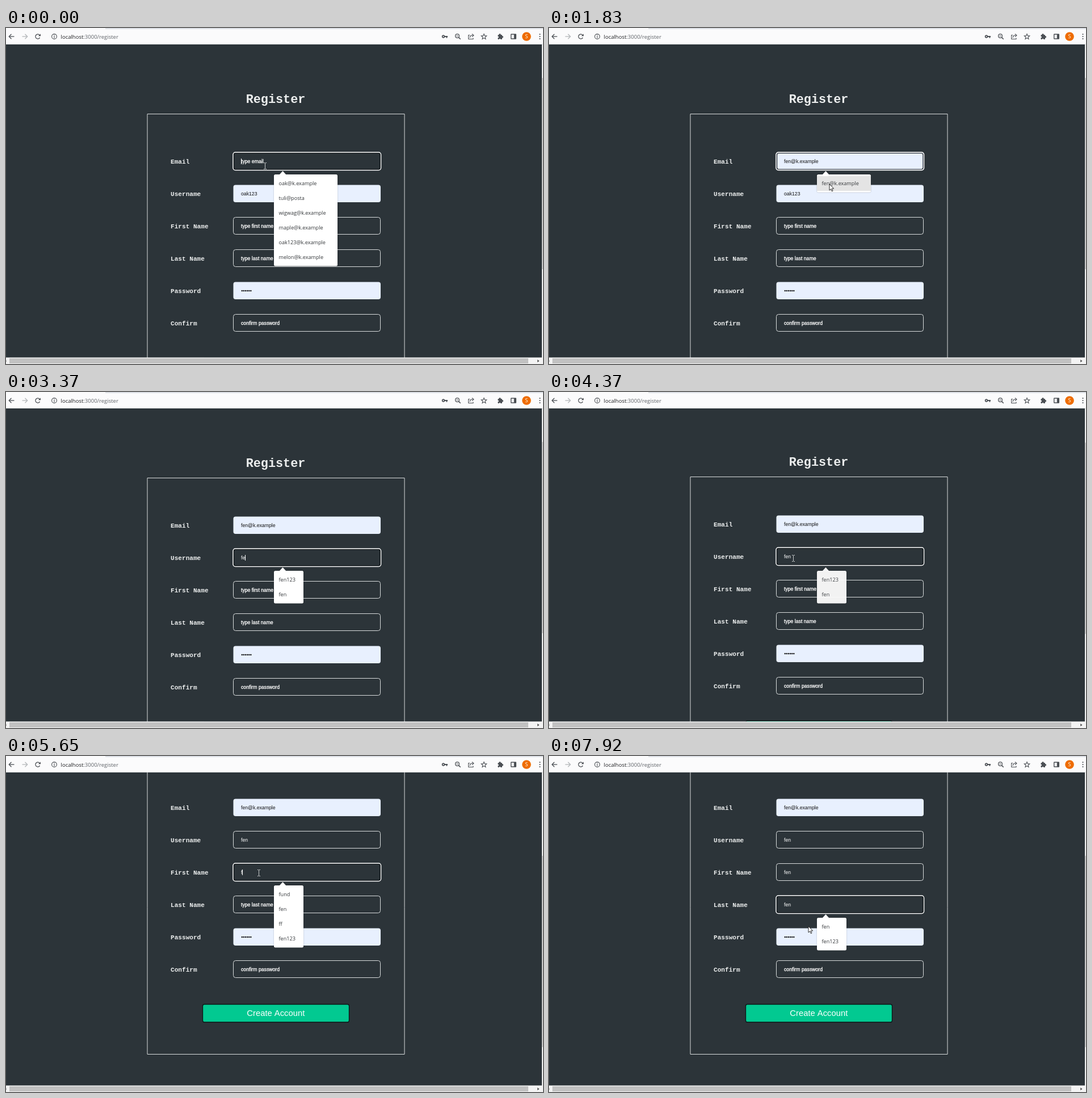
Write an HTML page with a canvas that moves like this. It is 946 by 592 pixels and loops after 8 s.

```html
<!DOCTYPE html>
<html lang="en">
<head>
<meta charset="utf-8">
<title>Register</title>
<style>
  html, body { margin: 0; width: 100%; height: 100%; overflow: hidden; background: #2c3439; }
  canvas { display: block; width: 946px; height: 592px; }
</style>
</head>
<body>
<canvas id="stage" width="946" height="592"></canvas>
<script>
const ctx = document.getElementById('stage').getContext('2d');
const LOOP = 8000, RATE = 0.011;
const SANS = '"Liberation Sans", Arial, sans-serif';
const UI = '"Open Sans", "Noto Sans", sans-serif';
const MONO = '"Liberation Mono", monospace';
const INPUT_FONT = '8.7px ' + SANS;
const BG = '#2c3439', FILLED = '#e8f0fe';
const TEXT_X = 414;
const MAIL = 'fen@k.example';

// Each value is [time, text]; an empty text shows the placeholder.
const fields = [
  { label: 'Email', hint: 'type email', filled: [1540, LOOP],
    values: [[0, ''], [540, 'f'], [630, 'fe'], [720, 'fen'], [1540, MAIL]] },
  { label: 'Username', hint: 'type username', filled: [0, 3180],
    values: [[0, 'oak123'], [3180, ''], [3270, 'f'], [3360, 'fe'], [3440, 'fen']] },
  { label: 'First Name', hint: 'type first name',
    values: [[0, ''], [5630, 'f'], [5720, 'fe'], [5810, 'fen']] },
  { label: 'Last Name', hint: 'type last name',
    values: [[0, ''], [7090, 'f'], [7270, 'fe'], [7400, 'fen']] },
  { label: 'Password', dots: true, filled: [0, LOOP], values: [[0, '']] },
  { label: 'Confirm', hint: 'confirm password', values: [[0, '']] }
];
const focusTimes = [[-140, 0], [2440, 1], [5180, 2], [6880, 3]];
const noCaret = [[1540, 2440], [2540, 3180]];

// from, to, field, width, rows
const popups = [
  [0, 540, 0, 112, ['oak@k.example', 'tuli@posta', 'wigwag@k.example', 'maple@k.example',
    'oak123@k.example', 'melon@k.example']],
  [540, 2090, 0, 95, [MAIL]],
  [2440, 3180, 1, 130, null],
  [3270, 4450, 1, 52, ['fen123', 'fen']],
  [5630, 5720, 2, 52, ['fund', 'fen', 'ff', 'fen123']],
  [5720, 6880, 2, 52, ['fen', 'fen123']],
  [7090, 7270, 3, 52, ['fund', 'fen', 'ff', 'fen123', 'fff']],
  [7270, LOOP, 3, 52, ['fen', 'fen123']]
];

// time, x, y, shape until the next point: I = text beam, A = arrow, '' = hidden
const mouse = [
  [0, 456, 243, 'I'], [540, 456, 243, ''], [1270, 456, 243, 'I'], [1450, 472, 256, 'A'],
  [1810, 494, 275, 'A'], [2090, 494, 275, 'A'], [2300, 462, 289, 'I'], [2440, 447, 292, 'I'],
  [2540, 445, 292, 'I'], [2700, 400, 292, 'A'], [2810, 386, 292, 'A'], [3180, 386, 292, ''],
  [4000, 404, 297, 'I'], [4270, 430, 293, 'I'], [4600, 430, 293, 'I'], [4815, 441, 229, 'I'],
  [4995, 445, 206, 'I'], [5720, 445, 206, ''], [6270, 445, 208, 'I'], [6500, 448, 228, 'A'],
  [6700, 450, 250, 'I'], [6900, 452, 262, 'I'], [7090, 452, 262, ''],
  [7810, 456, 291, 'A'], [7905, 457, 300, 'A'], [LOOP, 457, 300, 'A']
];

const within = (t, span) => !!span && t >= span[0] && t < span[1];
const latest = (list, t) => list.filter(e => e[0] <= t).pop();
const clamp = (v, lo, hi) => Math.min(hi, Math.max(lo, v));

function mouseAt(t) {
  const i = Math.max(0, mouse.filter(m => m[0] <= t).length - 1);
  const a = mouse[i], b = mouse[i + 1] || a;
  const p = b === a ? 0 : (t - a[0]) / (b[0] - a[0]);
  return { x: a[1] + (b[1] - a[1]) * p, y: a[2] + (b[2] - a[2]) * p, shape: a[3] };
}

function scrollAt(t) {
  const p = clamp((t - 4348) / 208.5, 0, 1);
  return Math.round(72 * (1 - Math.cos(Math.PI * p)));
}

function rect(x, y, w, h, color) {
  ctx.fillStyle = color;
  ctx.fillRect(x, y, w, h);
}

function round(x, y, w, h, r, fill, stroke, width = 1) {
  ctx.beginPath();
  ctx.roundRect(x, y, w, h, r);
  if (fill) { ctx.fillStyle = fill; ctx.fill(); }
  if (stroke) { ctx.strokeStyle = stroke; ctx.lineWidth = width; ctx.stroke(); }
}

function disc(x, y, r, color) {
  ctx.beginPath();
  ctx.arc(x, y, r, 0, 7);
  ctx.fillStyle = color;
  ctx.fill();
}

function ring(x, y, r, color, width = 1.2, from = 0, to = 7) {
  ctx.beginPath();
  ctx.arc(x, y, r, from, to);
  ctx.strokeStyle = color;
  ctx.lineWidth = width;
  ctx.stroke();
}

function poly(points, fill, stroke, width = 1, closed = true) {
  ctx.beginPath();
  points.forEach(([x, y]) => ctx.lineTo(x, y));
  if (closed) ctx.closePath();
  if (fill) { ctx.fillStyle = fill; ctx.fill(); }
  if (stroke) { ctx.strokeStyle = stroke; ctx.lineWidth = width; ctx.stroke(); }
}

const line = (points, color, width = 1.3) => poly(points, null, color, width, false);

function text(str, x, y, font, color, align = 'left') {
  ctx.font = font;
  ctx.fillStyle = color;
  ctx.textAlign = align;
  ctx.fillText(str, x, y);
}

function textWidth(str, font) {
  ctx.font = font;
  return ctx.measureText(str).width;
}

function dots(x, y, step, r, color) {
  for (let i = 0; i < 6; i++) disc(x + i * step, y, r, color);
}

const fieldTop = (i, scroll) => 219 + 57 * i - scroll;

function drawField(i, t, scroll, focused) {
  const f = fields[i], y = fieldTop(i, scroll), base = y + 19;
  const filled = within(t, f.filled), value = latest(f.values, t)[1];
  text(f.label, 290, y + 20, 'bold 11.1px ' + MONO, '#eceeee');

  if (focused) {
    round(400, y, 260.5, 31.5, 4, filled ? FILLED : BG, '#fff', 1.5);
    round(401.5, y + 1.5, 257.5, 28.5, 3, null, '#101518', 1.2);
  } else if (filled) {
    round(400.5, y + 0.5, 259.5, 30.5, 4, FILLED);
  } else {
    round(400.5, y + 0.5, 259, 30, 4, null, '#d9dcdd');
  }

  if (f.dots) {
    dots(TEXT_X + 1.8, y + 16, 3.1, 1.25, '#111');
  } else if (value) {
    text(value, TEXT_X, base, INPUT_FONT, filled ? '#111' : '#fff');
  } else {
    text(f.hint, TEXT_X, base, INPUT_FONT, '#fff');
    ctx.strokeStyle = '#fff';
    ctx.lineWidth = 0.3;
    ctx.strokeText(f.hint, TEXT_X, base);
  }
  if (!focused) return;

  if (i === 1 && within(t, [2540, 3180])) {
    const end = TEXT_X + textWidth(value, INPUT_FONT);
    const start = clamp(mouseAt(t).x, TEXT_X, end);
    ctx.save();
    ctx.beginPath();
    ctx.rect(start, y + 10, end - start, 12);
    ctx.clip();
    rect(start, y + 10, end - start, 12, '#3390ff');
    text(value, TEXT_X, base, INPUT_FONT, '#fff');
    ctx.restore();
  }

  const since = Math.max(latest(focusTimes, t)[0], latest(f.values, t)[0] || -140);
  const shown = Math.floor((t - since) / 500) % 2 === 0;
  if (shown && !noCaret.some(n => within(t, n))) {
    const x = Math.round(TEXT_X + textWidth(value, INPUT_FONT));
    rect(x, y + 11, 1, 10, filled ? '#111' : '#fff');
  }
}

function drawPage(t, scroll) {
  rect(0, 28, 946, 553, BG);
  text('Register', 475, 132 - scroll, 'bold 21.8px ' + MONO, '#eceeee', 'center');
  round(249, 151.5 - scroll, 453, 518, 0, null, '#d9dcdd');
  const focus = latest(focusTimes, t)[1];
  fields.forEach((f, i) => drawField(i, t, scroll, i === focus));
  round(346.5, 581.5 - scroll, 258, 31.5, 3, '#02c991', '#0c1416', 1.3);
  text('Create Account', 475.3, 602 - scroll, '14.8px ' + SANS, '#fff', 'center');
}

function drawAccounts(top) {
  disc(486.5, top + 23, 4.6, '#5f6368');
  poly([[484, top + 20], [487, top + 20], [486, top + 23], [483.5, top + 23]], '#e4e6e8');
  poly([[487, top + 23], [490, top + 22], [488, top + 26], [486, top + 25]], '#e4e6e8');
  text('oak123', 501, top + 19, '9.1px ' + UI, '#3c4043');
  dots(502.5, top + 31.5, 4, 1.1, '#5f6368');
  rect(472, top + 47, 130, 1, '#dadce0');
  disc(486.5, top + 64, 4.6, '#5f6368');
  text('Manage passwords...', 501, top + 67, '8.9px ' + UI, '#5f6368');
}

function drawPopup([from, to, field, width, rows], t) {
  const top = fieldTop(field, field > 1 ? 144 : 0) + 39;
  const height = rows ? 6 + 26 * rows.length : 79;
  ctx.save();
  if (within(t, [4340, 4450])) ctx.globalAlpha = 0.94;
  ctx.shadowColor = 'rgba(0,0,0,.3)';
  ctx.shadowBlur = 2;
  round(472, top, width, height - 0.5, 2.5, '#fff');
  ctx.shadowColor = 'transparent';
  poly([[481.5, top + 0.5], [487.5, top - 6], [493.5, top + 0.5]], '#fff');
  if (rows) {
    if (within(t, [1540, 2090])) rect(472, top + 3, width, 26, '#e4e4e4');
    rows.forEach((row, i) => text(row, 480.5, top + 19 + 26 * i, '9.1px ' + UI, '#35383b'));
  } else {
    drawAccounts(top);
  }
  ctx.restore();
}

function drawToolbar() {
  const dark = '#4b4f54';
  rect(0, 0, 946, 28, '#fbfbfc');
  rect(0, 28, 946, 1, '#e3e5e7');
  rect(175, 0, 771, 2, '#dee1e6');

  const arrow = (x, dir, color) => {
    line([[x - 4.5 * dir, 15], [x + 4.5 * dir, 15]], color);
    line([[x + 0.5 * dir, 10.8], [x + 4.7 * dir, 15], [x + 0.5 * dir, 19.2]], color);
  };
  arrow(10, -1, dark);
  arrow(33, 1, '#b3b6b9');
  ring(56, 15, 4, dark, 1.4, 0.5, 5.6);
  poly([[57, 14.3], [61, 14.3], [61, 10.3]], dark);
  ring(85, 15, 4.4, dark, 1.1);
  rect(84.4, 14.3, 1.2, 3.2, dark);
  rect(84.4, 12.3, 1.2, 1.2, dark);

  const font = '9.5px ' + UI, host = 'localhost';
  text(host, 96.5, 18.5, font, '#202124');
  text(':3000/register', 96.5 + textWidth(host, font), 18.5, font, '#5f6368');

  ring(770.5, 15, 1.9, dark, 1.7);
  rect(772.5, 14, 5.5, 2, dark);
  rect(775.5, 15, 1.8, 2.6, dark);

  ring(795, 14, 3.4, dark, 1.2);
  line([[797.5, 16.6], [800.7, 19.8]], dark, 1.5);
  line([[793.3, 14], [796.7, 14]], dark, 1);

  line([[817, 12.5], [814.7, 12.5], [814.7, 19.5], [823, 19.5], [823, 17.5]], dark, 1.1);
  line([[817, 17], [818, 14.2], [820, 13], [823.5, 13]], dark, 1.1);
  line([[821, 10.4], [824, 13], [821, 15.6]], dark, 1.1);

  const star = [];
  for (let i = 0; i < 10; i++) {
    const r = i % 2 ? 2.2 : 5, a = i * Math.PI / 5;
    star.push([842 + r * Math.sin(a), 15.4 - r * Math.cos(a)]);
  }
  poly(star, null, dark, 1.1);

  round(866.5, 12, 7.5, 8, 1, dark);
  disc(870, 11.8, 1.7, dark);
  disc(874.4, 15.8, 1.7, dark);
  disc(866.8, 16, 1.2, '#fbfbfc');
  disc(870, 20, 1.2, '#fbfbfc');

  round(889.7, 11, 8.6, 8, 0.5, null, dark, 1.4);
  rect(894.8, 11, 3.5, 8, dark);

  disc(917, 15, 7.8, '#ee6c00');
  text('S', 917, 18.2, '9px ' + UI, '#fff', 'center');
  for (let i = -1; i < 2; i++) disc(940.5, 15 + 4 * i, 1.1, dark);
}

function drawScrollbars(scroll) {
  rect(944, 29, 2, 552, '#f1f1f1');
  rect(944.5, 88 + scroll * 0.61, 1.5, 337, '#c1c1c1');
  rect(0, 580.5, 946, 11.5, '#f3f3f3');
  rect(6, 582, 914, 9, '#c1c1c1');
  poly([[936.2, 584.3], [939.6, 586.7], [936.2, 589.1]], '#505050');
  rect(0, 585.5, 1, 2.5, '#a3a3a3');
}

function drawMouse({ x, y, shape }) {
  if (shape === 'I') {
    const color = '#c9cccd';
    rect(Math.round(x), y - 5, 1, 10, color);
    rect(Math.round(x) - 2, y - 6, 2, 1, color);
    rect(Math.round(x) + 1, y - 6, 2, 1, color);
    rect(Math.round(x) - 2, y + 5, 2, 1, color);
    rect(Math.round(x) + 1, y + 5, 2, 1, color);
  } else if (shape === 'A') {
    const tip = [[0, 0], [0, 11], [2.5, 8.7], [4.3, 12.7], [6, 12], [4.2, 8], [7.8, 8]];
    poly(tip.map(([dx, dy]) => [x + dx, y + dy]), '#fff', '#1a1a1a', 0.9);
  }
}

function draw(now) {
  const t = Math.floor((now % LOOP) * RATE + 1e-6) / RATE;
  const scroll = scrollAt(t);
  drawPage(t, scroll);
  popups.filter(p => within(t, p)).forEach(p => drawPopup(p, t));
  drawToolbar();
  drawScrollbars(scroll);
  drawMouse(mouseAt(t));
}

const start = performance.now();
function tick() {
  draw(performance.now() - start);
  requestAnimationFrame(tick);
}
tick();
</script>
</body>
</html>
```
